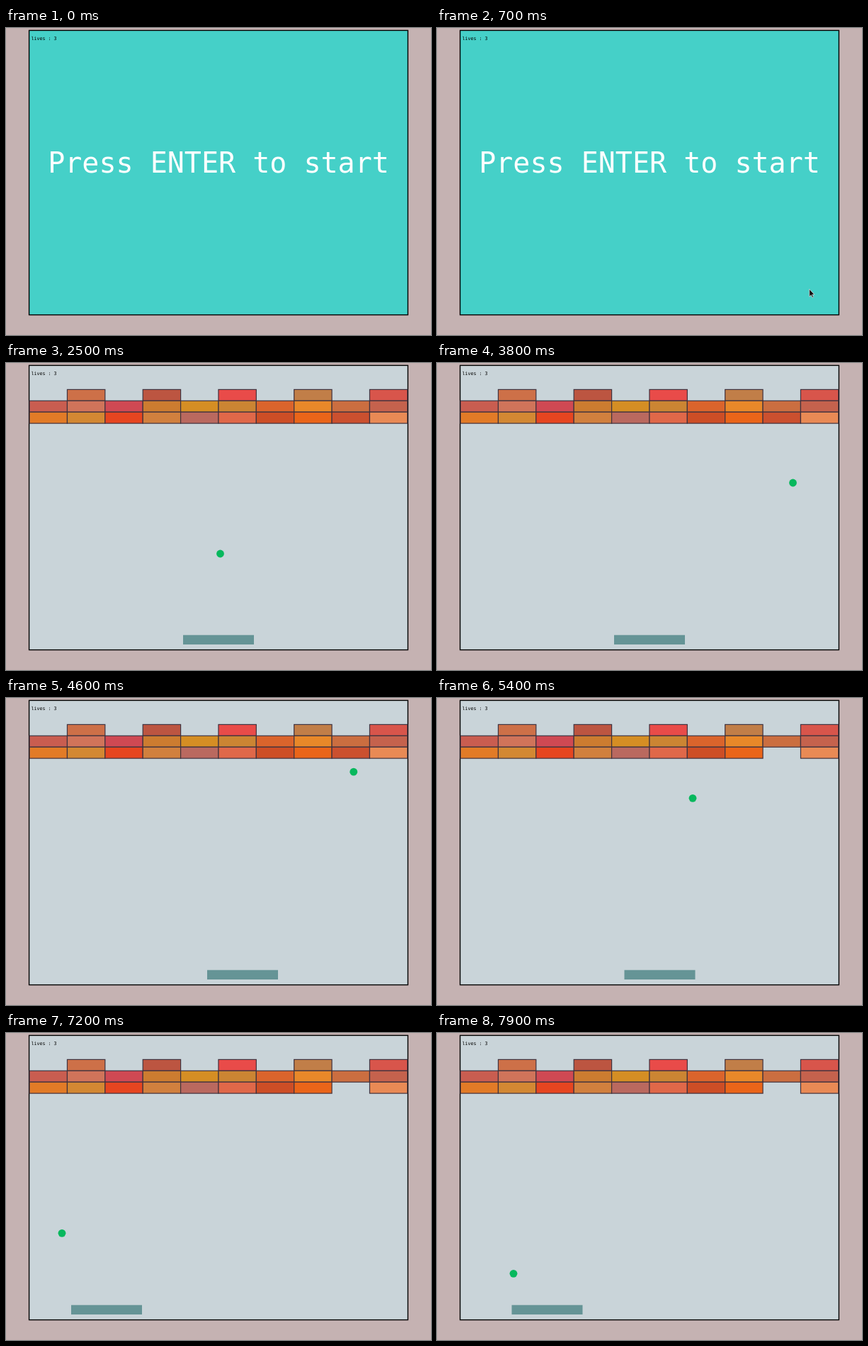
Write an HTML page that moves like this. It is 600 by 433 pixels and loops after 8 s.

```html
<!DOCTYPE html>
<html lang="en">
<head>
<meta charset="utf-8">
<title>Brick breaker</title>
<style>
  html, body { margin: 0; width: 100%; height: 100%; overflow: hidden; background: #c5b2b2; }
  svg { display: block; }
  text { font-family: "DejaVu Sans Mono", "Liberation Mono", monospace; white-space: pre; }
</style>
</head>
<body>
<svg width="600" height="433" viewBox="0 0 600 433">
  <rect id="field" x="32.6" y="3.4" width="534.8" height="401.2" stroke="#000" stroke-width="1.4"/>
  <g id="game">
    <g id="bricks" stroke="#40333f" stroke-width="1.2"></g>
    <rect id="paddle" y="383.7" width="100" height="13.3" fill="#659496"/>
    <circle id="ball" r="5.4" fill="#07b85d"/>
  </g>
  <g id="intro">
    <text x="300" y="204.3" font-size="40" text-anchor="middle" fill="#fff">Press ENTER to start</text>
    <path id="cursor" d="M0 0V10.6L2.5 8.4L4.2 12L5.8 11.2L4.2 7.7H7.2Z" fill="#111" stroke="#e8e8e8" stroke-width=".7"/>
  </g>
  <text x="35.4" y="17.4" font-size="6.67" fill="#000">lives : 3</text>
</svg>
<script>
const LOOP = 8000, STEP = 100, GAME_START = 2500;
const LEFT = 36.5, RIGHT = 561.5, TOP = 90.3;
const HIT_BRICK = '2-8';

const $ = id => document.getElementById(id);
const field = $('field'), game = $('game'), intro = $('intro');
const bricks = $('bricks'), paddle = $('paddle'), ball = $('ball'), cursor = $('cursor');

// Rows from top to bottom; null leaves a gap.
const rows = [
  [null, '#cd7048', null, '#bc5541', null, '#e94b49', null, '#c17e48', null, '#d8554b'],
  ['#c95d50', '#d0745a', '#cf4953', '#cc7c30', '#d58e24', '#cb8533', '#da642c', '#e88829', '#cb6e40', '#c5624d'],
  ['#e27b27', '#d38833', '#e64520', '#d1803e', '#ba695f', '#e06849', '#cd4e26', '#ea6519', '#cb502f', '#e98a55']
];
rows.forEach((row, r) => row.forEach((fill, c) => {
  if (!fill) return;
  const brick = document.createElementNS('http://www.w3.org/2000/svg', 'rect');
  const attrs = { id: `${r}-${c}`, x: 33.1 + c * 53.37, y: 37.4 + r * 15.9, width: 53.37, height: 15.9, fill };
  for (const key in attrs) brick.setAttribute(key, attrs[key]);
  bricks.append(brick);
}));
const target = $(HIT_BRICK);

// Tables of [time, value]; straight lines between the steps.
const travel = [[2500, 0], [3800, 200], [5400, 459.5], [6500, 627.5], [7900, 855.5]];
const paddleX = [[3900, 250], [4500, 284], [4900, 284], [5400, 264.5], [6500, 110], [7000, 92], [7300, 92], [7900, 105.5]];
const cursorX = [[600, 548], [1200, 414]];
const cursorY = [[600, 401], [1200, 204.5]];

function at(table, t) {
  if (t <= table[0][0]) return table[0][1];
  for (let i = 1; i < table.length; i++) {
    const [t0, a] = table[i - 1], [t1, b] = table[i];
    if (t <= t1) return a + (b - a) * (t - t0) / (t1 - t0);
  }
  return table[table.length - 1][1];
}

// Reflects an unbounded position between two walls.
function bounce(v, lo, hi) {
  const span = hi - lo;
  const m = (((v - lo) % (2 * span)) + 2 * span) % (2 * span);
  return lo + (m > span ? 2 * span - m : m);
}

function draw(t) {
  const playing = t >= GAME_START;
  field.setAttribute('fill', playing ? '#c9d4d9' : '#45d0c8');
  game.style.display = playing ? '' : 'none';
  intro.style.display = playing ? 'none' : '';
  if (!playing) {
    cursor.style.display = t >= cursorX[0][0] ? '' : 'none';
    cursor.setAttribute('transform', `translate(${at(cursorX, t)} ${at(cursorY, t)})`);
    return;
  }
  const s = at(travel, t);
  const rise = 269 - s / 2;
  ball.setAttribute('cx', bounce(302.5 + s, LEFT, RIGHT));
  ball.setAttribute('cy', TOP + Math.abs(rise - TOP));
  paddle.setAttribute('x', at(paddleX, t));
  target.style.display = rise > TOP ? '' : 'none';
}

const start = performance.now();
function tick() {
  const t = (performance.now() - start) % LOOP;
  draw(Math.floor(t / STEP) * STEP);
  requestAnimationFrame(tick);
}
tick();
</script>
</body>
</html>
```
